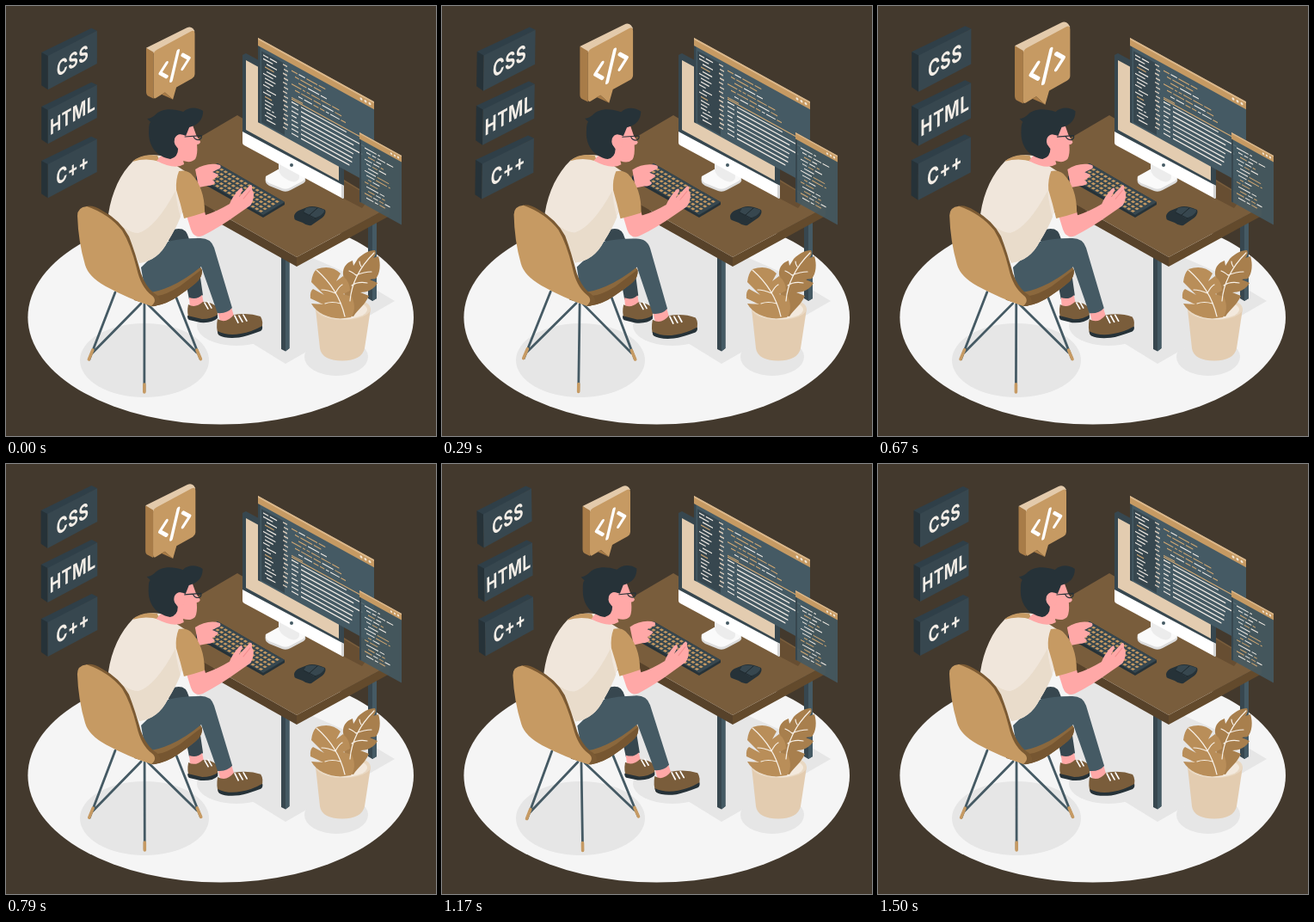
An HTML page for the animation above (1540 ms loop, 500 by 500 pixels).

```html
<!DOCTYPE html>
<html lang="en">
<head>
<meta charset="utf-8">
<title>Coding at a desk</title>
<style>
html, body { margin: 0; width: 100%; height: 100%; overflow: hidden; background: #43392d; }
svg { display: block; width: 100vw; height: 100vh; }
text { font: 700 24px Inter, Roboto, sans-serif; letter-spacing: .6px; text-anchor: middle; fill: #f3ede6; }
.line { fill: none; stroke-linecap: round; stroke-linejoin: round; }
</style>
</head>
<body>
<svg viewBox="0 0 500 500">
  <rect width="500" height="500" fill="#43392d"/>

  <!-- floor and shadows -->
  <ellipse cx="249.7" cy="362" rx="224.3" ry="124.6" fill="#f5f5f5"/>
  <g fill="#e6e6e6">
    <ellipse cx="161" cy="412" rx="75" ry="43"/>
    <ellipse cx="384" cy="408" rx="37" ry="22"/>
    <ellipse cx="268" cy="372" rx="46" ry="23"/>
    <path d="M325 416L452 343L400 312L236 240L222 262L218 350Z"/>
  </g>

  <!-- desk -->
  <path d="M320 288h9.500v110l-4.500 3.500l-5-2.500zM421 246h10v94l-5 3l-5-3z" fill="#37474f"/>
  <path d="M325 290h4.500v108l-4.500 3.500zM426 246h5v94l-5 3z" fill="#455a64"/>
  <path d="M160 191L338 292V303L160 203Z" fill="#57422a"/>
  <path d="M338 292L446 234V244L338 303Z" fill="#634a2c"/>
  <path d="M269 127L446 234L338 292L160 191Z" fill="#795d3c"/>
  <path d="M275 160L393 224L414 235L424 222L300 150Z" fill="#674e32"/>

  <!-- monitor -->
  <path d="M302 199Q300 206 306 209L321 215Q326 217 331 214L346 206Q350 203 347 198L320 188Z" fill="#dcdcdc"/>
  <path d="M302 198Q301 203 306 206L321 212Q326 214 331 211L346 203Q349 200 345 197L322 187Z" fill="#fafafa"/>
  <path d="M317 180L341 193V200Q338 207 329 203Q317 197 317 190Z" fill="#ececec"/>
  <path d="M275 57L279 55L393 117V212L275 148Z" fill="#37474f"/>
  <path d="M279 63L387 122V203L279 144Z" fill="#e3ccb0"/>
  <path d="M275 146L393 209V222Q393 225 390 223L277 162Q275 161 275 159Z" fill="#fff"/>
  <path d="M390 207.500L393 209V222Q393 225 390 223Z" fill="#d5d5d5"/>
  <circle cx="332" cy="185" r="2" fill="#455a64"/>

  <!-- floating windows -->
  <g transform="matrix(1 .55 0 1 293 37)">
    <rect width="135" height="98" fill="#455a64"/>
    <rect y="9" width="2.500" height="89" fill="#37474f"/>
    <rect x="4" y="13" width="27" height="83" fill="#37474f"/>
    <rect width="135" height="9" fill="#c69a63"/>
    <rect width="135" height="2" fill="#dcb98d"/>
    <g fill="#f3e7d6"><circle cx="120" cy="5" r="1.500"/><circle cx="125" cy="5" r="1.500"/><circle cx="130" cy="5" r="1.500"/></g>
    <g id="main"></g>
  </g>
  <g transform="matrix(1 .55 0 1 411 147)">
    <rect width="49" height="80.500" fill="#455a64" fill-opacity=".88"/>
    <rect y="7" width="2" height="73.500" fill="#37474f"/>
    <rect width="49" height="7.500" fill="#c69a63"/>
    <rect width="49" height="1.600" fill="#dcb98d"/>
    <g fill="#f3e7d6"><circle cx="37" cy="4.300" r="1.200"/><circle cx="41" cy="4.300" r="1.200"/><circle cx="45" cy="4.300" r="1.200"/></g>
    <g id="small"></g>
  </g>

  <!-- keyboard and mouse -->
  <path d="M246 183L324 228V231L299 246L221 202V198Z" fill="#263238"/>
  <path d="M246 183L324 228L299 243L221 198Z" fill="#37474f"/>
  <g id="keys" fill="#c69a63"></g>
  <path d="M335 245Q335 241 340 238L350 234Q358 231 371 237Q373 241 368 246L355 255Q350 256 345 252L337 249Q335 248 335 245Z" fill="#263238"/>
  <path d="M349 235Q358 232 370 237Q371 240 365 244L358 247L346 240Z" fill="#37474f"/>
  <path class="line" d="M346 240L360 247M353 243L362 235" stroke="#1d272c"/>

  <!-- plant -->
  <path d="M360 352L365 398Q367 412 391 412.500Q414 412 417 398L424 352Z" fill="#e3ccb0"/>
  <ellipse cx="392" cy="352" rx="32" ry="13" fill="#e9d8c2"/>
  <ellipse cx="392" cy="353" rx="28" ry="11" fill="#f3e9dd"/>
  <path d="M399 360C397 345 390 332 394 319C389 308 394 299 403 296L404 302L409 294C415 288 422 284 429 284C431 287 429 291 427 293L433 291C436 300 435 311 430 317L423 318L432 322C428 330 419 333 412 333L422 337C418 347 409 353 404 361Z" fill="#a87f4d"/>
  <path d="M394 363C380 365 362 359 355 346L369 347L354 340Q353 332 357 329L370 336L355 321Q356 311 361 306Q378 300 389 311L384 320L392 314Q400 321 400 331L392 335L402 338C407 348 405 358 401 362Z" fill="#b98e59"/>
  <g class="line" stroke="#f8f1e7" stroke-width="1.200">
    <path d="M361 307C376 320 389 339 394 361M383 334Q374 330 367 330M389 346Q379 343 371 346M383 334Q387 326 391 324"/>
    <path d="M428 287C415 300 402 318 400 343M413 303Q411 300 411 297M407 313Q402 309 399 308M407 313Q417 309 425 309M402 325Q409 320 420 322"/>
  </g>

  <!-- seated coder -->
  <g id="coder">
    <path d="M185 266Q195 257 205 259.500Q212 262 214 277L224 302L229 336Q222 343 213 341L205 300Z" fill="#37474f"/>
    <path d="M213 339Q222 342 228 336L230 346Q227 353 214 350Z" fill="#ffa8a7"/>
    <path d="M212 347Q220 352 229 344Q240 344 246 351V362Q240 367 228 367L213 364Q210 357 212 347Z" fill="#7a5d3b"/>
    <path d="M211 360L228 364Q239 364 246 359V363Q240 369 226 368L213 365Q211 364 211 360Z" fill="#263238"/>
    <path class="line" d="M231 345L235 352M235 344L239 351" stroke="#fff" stroke-width="1.600"/>

    <g class="line" stroke="#455a64" stroke-width="2.800">
      <path d="M127 333L97 411M157 346L100 404M161 347V448M165 347L222 403M198 339L226 410"/>
    </g>
    <path class="line" d="M101 400L96.500 411M161 440V449M222 400L226.500 410.500" stroke="#c69a63" stroke-width="3.600"/>

    <path d="M155 330L190 325L222 302Q230 303 227 314Q222 323 202 336Q187 347 172 349L150 341Z" fill="#8b683d"/>
    <path d="M147 332L176 337Q186 336 202 326L228 306Q229 316 220 323L201 337Q187 347 172 349L149 342Z" fill="#765631"/>

    <path d="M246 354Q256 358 262 350L265 360Q267 368 250 370Z" fill="#ffa8a7"/>
    <path d="M246 364Q256 370 265 359Q282 356 296 361Q300 367 297 376Q284 381 274 384Q255 387 247 382Q244 375 246 364Z" fill="#7a5d3b"/>
    <path d="M246 378Q258 384 273 381Q286 379 298 372Q299 376 296 378Q280 384 271 385.500Q255 387 248 383Q246 381 246 378Z" fill="#263238"/>
    <path class="line" d="M266 360L270 368M271 360L275 367M276 359L280 366" stroke="#fff" stroke-width="1.700"/>

    <path d="M157 304L188 274Q204 270 224 270Q238 269 242 281L263 351Q257 358 246 357L227 303Q209 318 191 326Q173 334 162 333Z" fill="#455a64"/>

    <path d="M148 180C133 195 123 216 119 242Q134 256 143 275L155 299Q177 296 188 274Q198 258 202 245L212 228L211 194L180 174Q162 171 148 180Z" fill="#f0e6db"/>
    <path d="M119 242Q140 264 154 264Q174 258 197 215Q199 233 203 245Q198 258 188 274Q177 296 155 299L143 275Q134 256 119 242Z" fill="#e9dccb"/>
    <path d="M147 181Q158 171 176 174L179 181Q163 176 147 181Z" fill="#c69a63"/>

    <!-- far hand, near arm -->
    <path d="M220 190C229 184 240 182 249 185Q251 189 246 190L240 193L247 196Q245 200 240 202L243 205Q241 209 234 209L224 211Z" fill="#ffa8a7"/>
    <path d="M210 244L231 239L232 243Q245 239 260 230Q263 222 271 213Q275 209 275 214L271 222L284 208Q287 208 286 213L288 218Q288 227 284 232L271 241Q249 257 229 267Q219 271 215 260Z" fill="#ffa8a7"/>
    <path class="line" d="M284 214L276 224" stroke="#f28f8f"/>
    <path d="M201 192Q209 190 215 195Q231 211 231 240Q219 244 207 247Q203 230 198 214Q197 202 201 192Z" fill="#c69a63"/>

    <!-- head -->
    <path d="M189 151L216 136L221 150L226 158Q225 161 222 161Q223 173 220 178Q215 183 206 180L207 184Q196 191 175 180L185 169Z" fill="#ffa8a7"/>
    <path d="M173 127C179 120 191 118 206 123C212 117 222 117 229 122C229 132 224 138 213 141L209 151Q198 146 196 156Q197 163 200 166Q200 176 191 178C175 175 165 163 166 145Q166 136 168 135L164 131Q168 131 173 127Z" fill="#263238"/>
    <path d="M208 152Q200 146 196 154Q194 162 201 165Q206 166 208 160Z" fill="#ffa8a7"/>
    <path class="line" d="M208 152L227 150.500M218 152Q220 156 224.500 155.500Q228 154 227 150.500" stroke="#263238" stroke-width="1.200"/>

    <!-- chair back -->
    <path d="M93 233Q101 231 112 238Q133 249 143 268Q150 286 157 311Q162 325 171 333Q180 338 179 345Q175 350 169 349L154 342Z" fill="#7b5a33"/>
    <path d="M83 244Q83 234 94 233Q120 242 135 261Q145 277 152 305Q157 327 169 336Q177 342 169 349Q142 340 116 326Q96 315 92 301Q84 274 83 244Z" fill="#c69a63"/>
  </g>

  <!-- speech bubble -->
  <g id="bubble">
    <path d="M163.500 49L210 26Q214 24 217 27L219 30L175 57L171 55Z" fill="#e3caab"/>
    <path d="M163.500 49L172 54V107L166 104Q163.500 103 163.500 99Z" fill="#a87c48"/>
    <path d="M172 57Q172 53 176 51L215 30Q219 28 219 33V79Q219 82 216 84L198 94L194 108L185 100L175 106Q172 108 172 104Z" fill="#c69a63"/>
    <path d="M185 100L181 102L190 106L194 108Z" fill="#a87c48"/>
    <path transform="matrix(1 -.51 0 1 196 69.500)" class="line" d="M-9 -8L-16.500 0L-9 8M4 -15L-4 15M9 -8L16.500 0L9 8" stroke="#fff" stroke-width="3.700"/>
  </g>

  <g id="tags"></g>
</svg>
<script>
const $ = id => document.getElementById(id);
const LOOP = 1540, LEAD = 20;
const WHITE = '#f3ede6', TAN = '#d3a872';

let seed = 7;
const rnd = () => (seed = seed * 16807 % 2147483647) / 2147483647;
const rect = (x, y, w, h, fill) => `<rect x="${x}" y="${y}" width="${w}" height="${h}" fill="${fill}"/>`;

// broken strokes that look like a row of code
function row(x, end, y, h, tint) {
  let out = '';
  while (x < end - 2) {
    const w = Math.min(end - x, 3 + rnd() * 11);
    out += rect(x, y, w, h, rnd() < tint ? TAN : WHITE);
    x += w + 1.6;
  }
  return out;
}

function buildWindows() {
  let main = '', small = '';
  for (let i = 0; i < 18; i++) {
    const y = 16 + i * 4.3, x = 6 + Math.floor(rnd() * 3) * 2;
    main += row(x, x + 6 + rnd() * 11, y, 1.3, .15);
  }
  for (let i = 0; i < 15; i++) {
    const y = 16 + i * 5.2;
    main += rect(29 + i % 2, y - 2, 5, 1.6, '#d9cbbb');
    if (i < 7) {
      const x = 39 + (i % 3) * 4;
      main += row(x, x + 10 + rnd() * 50, y, 1.2, .6);
    } else {
      main += row(39, 47, y, 1.3, .2) + rect(50, y, 52 + rnd() * 22, 1.4, WHITE);
    }
  }
  main += rect(39, 49, 86, 1.2, TAN);
  for (let i = 0; i < 14; i++) {
    const x = 6 + (i % 3) * 2;
    small += row(x, x + 11 + rnd() * 22, 14 + i * 4.4, 1.1, .4);
  }
  $('main').innerHTML = main;
  $('small').innerHTML = small;
}

function buildKeys() {
  let out = '';
  for (let r = 0; r < 5; r++)
    for (let c = 0; c < 16; c++) {
      const x = 246 + c * 4.6 - r * 4.7, y = 186 + c * 2.65 + r * 2.8;
      out += `<path d="M${x} ${y}l2.9 1.65l-2.6 1.5l-2.9 -1.65z"/>`;
    }
  $('keys').innerHTML = out;
}

function buildTags() {
  $('tags').innerHTML = ['CSS', 'HTML', 'C++'].map((word, i) => `<g transform="translate(0 ${i * 63})"><g class="tag">
    <path d="M41.500 54L99 26L105.500 29L49 59Z" fill="#2f3f48"/>
    <path d="M41.500 54L49 58V97L41.500 92Z" fill="#263238"/>
    <path d="M49 58L105.500 29V67L49 97Z" fill="#37474f"/>
    <text transform="matrix(.73 -.42 0 1 77.500 72)">${word}</text></g></g>`).join('');
}

// linear track through [position, value] stops
function track(stops, p) {
  let i = 1;
  while (i < stops.length - 1 && p > stops[i][0]) i++;
  const [a, va] = stops[i - 1], [b, vb] = stops[i];
  return va + (vb - va) * (p - a) / (b - a);
}

const SWAY = [[0, 0], [.25, 1], [.75, -1], [1, 0]];
const BEAT = [[0, 0], [.14, 1], [.28, 0], [.42, 1], [.56, 0], [1, 0]];
const zoom = (k, x, y) => `translate(${x} ${y}) scale(${k}) translate(${-x} ${-y})`;

buildWindows();
buildKeys();
buildTags();
const tags = document.querySelectorAll('.tag');

function draw(ms) {
  const p = (ms + LEAD) % LOOP / LOOP;
  const sway = track(SWAY, p), beat = track(BEAT, p);
  $('coder').setAttribute('transform', `rotate(${sway} 191 284)`);
  $('tags').setAttribute('transform', `rotate(${sway} 73.5 124.5)`);
  $('bubble').setAttribute('transform', zoom(1 + .2 * beat, 191.5, 66.5));
  tags.forEach(tag => tag.setAttribute('transform', zoom(1 + .1 * beat, 73.5, 61.5)));
}

let start;
function tick(now) {
  start ??= now;
  draw(now - start);
  requestAnimationFrame(tick);
}
draw(0);
requestAnimationFrame(tick);
</script>
</body>
</html>
```
